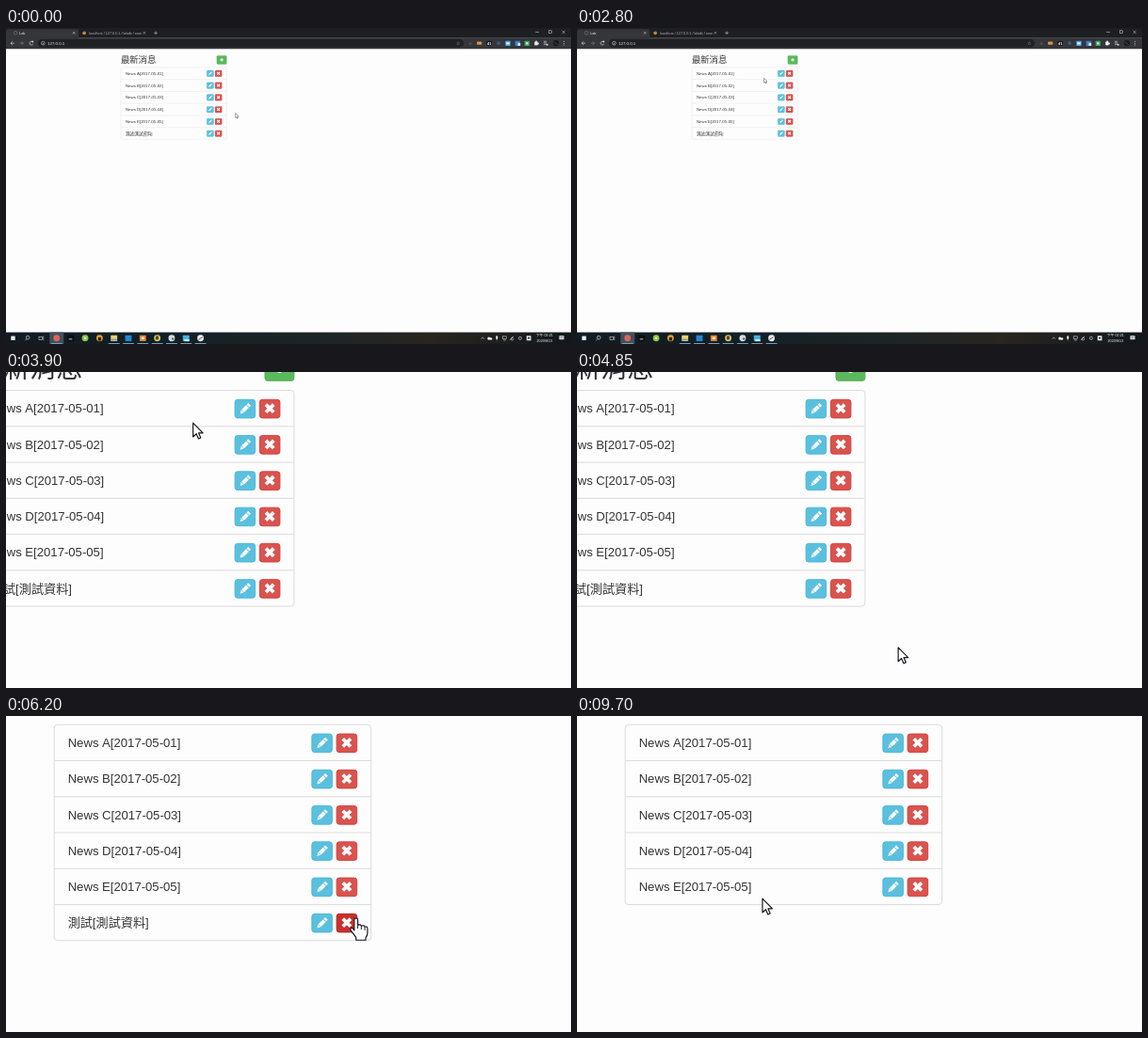
An HTML page with a canvas for the animation above (9750 ms loop, 600x336 px).

```html
<!DOCTYPE html>
<html lang="zh-Hant">
<head>
<meta charset="utf-8">
<title>News list</title>
<style>
html, body { margin: 0; width: 100%; height: 100%; overflow: hidden; background: #fdfdfd; }
canvas { display: block; width: 600px; height: 336px; }
</style>
</head>
<body>
<canvas id="stage" width="600" height="336"></canvas>
<script>
const ctx = document.getElementById('stage').getContext('2d');
const LOOP = 9750;
// The desktop is laid out in 1920 x 1080 units.
const SX = 600 / 1920, SY = 336 / 1080;
const SANS = '"Liberation Sans", Arial, sans-serif';
const CJK = '"Liberation Sans", "Noto Sans CJK TC", "Noto Sans CJK", sans-serif';
const DELETE_AT = 7150, HOVER_AT = 5230;
const rowTop = 134, rowStep = 41;
const rows = ['A', 'B', 'C', 'D', 'E'].map((c, i) => `News ${c}[2017-05-0${i + 1}]`);
rows.push('測試[測試資料]');

// time, zoom, horizontal offset, vertical offset
const camera = [
  [2850, 1, 0, 0], [3000, 2, 198.8, 52.5], [3700, 2, 198.8, 52.5],
  [3850, 3, 396.75, 106], [5450, 3, 396.75, 106], [5600, 3, 315, 116.3]
];
// time, pointer x, pointer y on the unzoomed stage
const pointer = [
  [1200, 243.5, 90.5], [2400, 198.4, 53.2], [4100, 198.3, 53.2],
  [4750, 245.8, 132.8], [4860, 245.8, 132.8], [5000, 236.3, 121],
  [5250, 228.9, 110.4], [7200, 228.9, 110.4], [7600, 173, 103.6],
  [8100, 173, 103.6], [8400, 170.5, 103.3]
];

function sample(keys, t, ease) {
  if (t <= keys[0][0]) return keys[0].slice(1);
  for (let i = 1; i < keys.length; i++) {
    const a = keys[i - 1], b = keys[i];
    if (t < b[0]) {
      const k = ease((t - a[0]) / (b[0] - a[0]));
      return a.slice(1).map((v, j) => v + (b[j + 1] - v) * k);
    }
  }
  return keys[keys.length - 1].slice(1);
}
const linear = k => k;
const smooth = k => k * k * (3 - 2 * k);

function rect(x, y, w, h, fill) {
  ctx.fillStyle = fill;
  ctx.fillRect(x, y, w, h);
}
function round(x, y, w, h, r, fill, stroke) {
  ctx.beginPath();
  ctx.roundRect(x, y, w, h, r);
  if (fill) { ctx.fillStyle = fill; ctx.fill(); }
  if (stroke) { ctx.strokeStyle = stroke; ctx.lineWidth = 1; ctx.stroke(); }
}
function dot(x, y, r, fill) {
  ctx.beginPath();
  ctx.arc(x, y, r, 0, Math.PI * 2);
  ctx.fillStyle = fill;
  ctx.fill();
}
function ring(x, y, r, color, start = 0, end = 7) {
  ctx.beginPath();
  ctx.arc(x, y, r, start, end);
  ctx.strokeStyle = color;
  ctx.lineWidth = 2;
  ctx.stroke();
}
function line(color, width, ...points) {
  ctx.beginPath();
  points.forEach(([x, y]) => ctx.lineTo(x, y));
  ctx.strokeStyle = color;
  ctx.lineWidth = width;
  ctx.stroke();
}
function text(s, x, y, size, color, family = SANS, align = 'left', weight = 400) {
  ctx.font = `${weight} ${size}px ${family}`;
  ctx.textAlign = align;
  ctx.textBaseline = 'alphabetic';
  ctx.fillStyle = color;
  ctx.fillText(s, x, y);
}
function placed(x, y, angle, draw) {
  ctx.save();
  ctx.translate(x, y);
  ctx.rotate(angle);
  draw();
  ctx.restore();
}
function plus(x, y, angle, arm, thick) {
  placed(x, y, angle, () => {
    rect(-arm, -thick / 2, arm * 2, thick, '#fff');
    rect(-thick / 2, -arm, thick, arm * 2, '#fff');
  });
}
function thinCross(x, y, r, color) {
  line(color, 1.6, [x - r, y - r], [x + r, y + r]);
  line(color, 1.6, [x + r, y - r], [x - r, y + r]);
}
function pencil(x, y) {
  placed(x, y, -Math.PI / 4, () => {
    rect(-3.6, -2.1, 7.4, 4.2, '#fff');
    rect(4.6, -2.1, 2.6, 4.2, '#fff');
    ctx.beginPath();
    ctx.moveTo(-4.2, -2.1);
    ctx.lineTo(-8, 0);
    ctx.lineTo(-4.2, 2.1);
    ctx.fill();
  });
}

function tabs() {
  rect(0, 0, 1920, 34, '#1e1f22');
  round(0, 4, 247, 34, [8, 8, 0, 0], '#35363a');
  rect(0, 33, 1920, 38.5, '#35363a');
  ring(32, 17, 6, '#77797d');
  text('Lab', 45, 21.5, 12, '#eceded');
  thinCross(231, 17, 4, '#e3e4e6');
  dot(266, 17, 6, '#b98a35');
  ctx.save();
  ctx.beginPath();
  ctx.rect(280, 4, 181, 28);
  ctx.clip();
  text('localhost / 127.0.0.1 / labdb / news', 281, 21.5, 12, '#b4b7bb');
  ctx.restore();
  thinCross(470, 17, 4, '#c7c9cc');
  line('#d6d7d9', 1.7, [503, 17], [515, 17]);
  line('#d6d7d9', 1.7, [509, 11], [509, 23]);
  line('#eee', 1.6, [1799, 14], [1811, 14]);
  ctx.lineWidth = 1.5;
  ctx.strokeRect(1845, 9, 9, 9);
  thinCross(1895, 14, 5, '#eee');
}

function toolbar() {
  const y = 52;
  line('#e2e3e5', 2, [28, y], [16, y]);
  line('#e2e3e5', 2, [22, y - 6], [16, y], [22, y + 6]);
  line('#85878b', 2, [47, y], [59, y]);
  line('#85878b', 2, [53, y - 6], [59, y], [53, y + 6]);
  ring(86, y, 6, '#e2e3e5', 0.3, 5.5);
  rect(88, y - 8, 5, 5, '#e2e3e5');
  round(108, 38, 1447, 28, 14, '#202124');
  ring(126, y, 6, '#c9cbce');
  line('#c9cbce', 2, [126, y - 1], [126, y + 4]);
  text('127.0.0.1', 141, 57, 14, '#ededee');
  text('☆', 1537, 58, 16, '#d8d9db', '"DejaVu Sans", sans-serif', 'center');
  text('∞', 1578, 57, 15, '#85878b', '"DejaVu Sans", sans-serif', 'center');
  round(1600, 47, 17, 10, 3, '#d8924a');
  round(1633, 44, 18, 16, 2, '#17181a');
  text('41', 1642, 57, 12, '#fff', SANS, 'center', 700);
  dot(1674, y, 6, '#365d7d');
  round(1697, 44, 17, 17, 2, '#3fa9e8');
  rect(1700, 49, 11, 7, '#e9f4fa');
  round(1730, 44, 17, 17, 2, '#3b7dd8');
  rect(1739, 51, 9, 10, '#d9e2ef');
  round(1762, 44, 17, 17, 2, '#36a866');
  rect(1767, 49, 7, 7, '#d7f0e0');
  rect(1796, 47, 11, 12, '#eee');
  dot(1802, 46, 3, '#eee');
  dot(1808, 53, 3, '#eee');
  [46, 51, 56].forEach(v => line('#ddd', 2, [1827, v], [1837, v]));
  dot(1839, 57, 3, '#ddd');
  dot(1869, y, 10, '#17191c');
  line('#777', 1.5, [1863, 49], [1874, 57]);
  [46, 52, 58].forEach(v => dot(1896, v, 1.6, '#e2e3e5'));
}

// x, colour, round or square, running
const apps = [
  [172, '#d9675b', 1, 1], [220, '#0a0c0d', 0, 0], [269, '#8cc63f', 1, 0],
  [318, '#e6a125', 1, 0], [367, '#f4cf62', 0, 1], [416, '#2387d3', 0, 1],
  [465, '#f17c2c', 0, 1], [514, '#dfc25a', 1, 1], [563, '#d5dde2', 1, 1],
  [612, '#42b4e6', 0, 1], [661, '#eeeeee', 1, 1]
];

function taskbar() {
  const y = 1060;
  const shade = ctx.createLinearGradient(0, 0, 1920, 0);
  [[0, '#111b22'], [0.3, '#122027'], [0.55, '#1c2526'], [0.75, '#29251f'], [1, '#11191d']]
    .forEach(([at, color]) => shade.addColorStop(at, color));
  rect(0, 1040, 1920, 40, shade);
  rect(17, y - 7, 14, 14, '#f2f2f2');
  ring(74, y - 2, 6, '#e5e5e5');
  line('#e5e5e5', 2, [70, y + 3], [65, y + 8]);
  ctx.lineWidth = 1.8;
  ctx.strokeRect(112, y - 5, 11, 10);
  line('#e5e5e5', 1.8, [127, y - 7], [127, y + 7]);
  rect(148, 1040, 48, 40, '#43505a');
  for (const [x, color, circular, running] of apps) {
    if (circular) dot(x, y, 11, color);
    else round(x - 11, y - 10, 22, 20, 2, color);
    if (running) rect(x - 19, 1077, 38, 3, '#76a9ca');
  }
  rect(213, y + 2, 12, 3, '#d9dddd');
  dot(269, y, 4, '#e5efd6');
  rect(313, y - 3, 10, 12, '#26231d');
  rect(357, y + 3, 20, 5, '#5ca6d2');
  rect(460, y - 4, 10, 8, '#fff0df');
  rect(509, y - 7, 9, 12, '#3c4140');
  dot(567, y + 2, 4, '#79685b');
  rect(606, y + 4, 17, 7, '#e0e8eb');
  line('#4c5459', 3, [654, y + 5], [668, y - 4]);

  line('#eee', 1.8, [1615, y + 3], [1620, y - 3], [1625, y + 3]);
  dot(1641, y + 1, 5, '#eee');
  dot(1648, y + 2, 4, '#eee');
  round(1665, y - 8, 6, 12, 3, '#eee');
  line('#eee', 1.6, [1668, y + 3], [1668, y + 8]);
  ctx.strokeRect(1687, y - 6, 14, 9);
  line('#eee', 1.8, [1690, y + 7], [1699, y + 7]);
  line('#eee', 2.5, [1713, y + 6], [1724, y - 6]);
  ring(1720, y + 3, 4, '#ddd');
  ring(1747, y, 5, '#ddd');
  rect(1769, y - 8, 15, 16, '#eee');
  rect(1773, y - 3, 7, 5, '#29251f');
  text('下午 02:21', 1830, 1054, 12, '#f1f1f1', CJK, 'center');
  text('2020/8/13', 1830, 1074, 12, '#f1f1f1', CJK, 'center');
  round(1880, y - 8, 16, 13, 1, '#eee');
  rect(1883, y - 4, 10, 1.5, '#333');
  rect(1883, y, 10, 1.5, '#333');
}

function button(x, y, w, h, fill, border) {
  round(x + 0.5, y + 0.5, w - 1, h - 1, 3, fill, border);
}

function page(t) {
  text('最新消息', 390, 120, 30, '#333', CJK, 'left', 300);
  button(716, 94, 34, 30, '#5cb85c', '#4cae4c');
  plus(733, 109, 0, 5.5, 3.8);

  const shown = t < DELETE_AT ? rows : rows.slice(0, -1);
  round(390.5, rowTop + 0.5, 359, shown.length * rowStep, 4, '#fdfdfd', '#d9d9d9');
  shown.forEach((label, i) => {
    const top = rowTop + i * rowStep, mid = top + 21.5;
    if (i) line('#d9d9d9', 1, [391, top + 0.5], [749, top + 0.5]);
    text(label, 406, top + 26, 14, '#333', CJK, 'left', i === 5 ? 300 : 400);
    button(682, mid - 11, 24, 22, '#5bc0de', '#46b8da');
    pencil(694, mid);
    const hot = i === 5 && t >= HOVER_AT;
    button(710, mid - 11, 24, 22, hot ? '#c9302c' : '#d9534f', hot ? '#ac2925' : '#d43f3a');
    plus(722, mid - 0.5, Math.PI / 4, 6.2, 4);
  });
}

function outline(path) {
  const shape = new Path2D(path);
  ctx.fillStyle = '#fff';
  ctx.fill(shape);
  ctx.strokeStyle = '#16161c';
  ctx.lineWidth = 1.25;
  ctx.lineJoin = 'round';
  ctx.stroke(shape);
}

function cursor(t) {
  const [x, y] = sample(pointer, t, smooth);
  ctx.save();
  ctx.translate(x / SX, y / SY);
  if (t >= HOVER_AT && t < DELETE_AT) {
    outline('M-2 14V2Q-2 0 0 0Q2 0 2 2V8Q5 6.5 6 9Q9 7.5 10 10Q13 9 13 12V17Q13 20 11 22V25H0V22L-6 14Q-7 11-4.5 11Q-3 12-2 14Z');
    line('#16161c', 1, [2, 8], [2, 12]);
    line('#16161c', 1, [6, 9], [6, 13]);
    line('#16161c', 1, [10, 10], [10, 14]);
  } else {
    outline('M0.5 0.5V16.5L4.2 13L6.7 18.7L9.2 17.6L6.8 12H11.7Z');
  }
  ctx.restore();
}

function draw(now) {
  const t = now % LOOP;
  const [zoom, ox, oy] = sample(camera, t, linear);
  ctx.setTransform(1, 0, 0, 1, 0, 0);
  rect(0, 0, 600, 336, '#fdfdfd');
  ctx.setTransform(zoom * SX, 0, 0, zoom * SY, -ox, -oy);
  tabs();
  toolbar();
  page(t);
  taskbar();
  cursor(t);
}

const start = performance.now();
function tick() {
  draw(performance.now() - start);
  requestAnimationFrame(tick);
}
tick();
</script>
</body>
</html>
```
